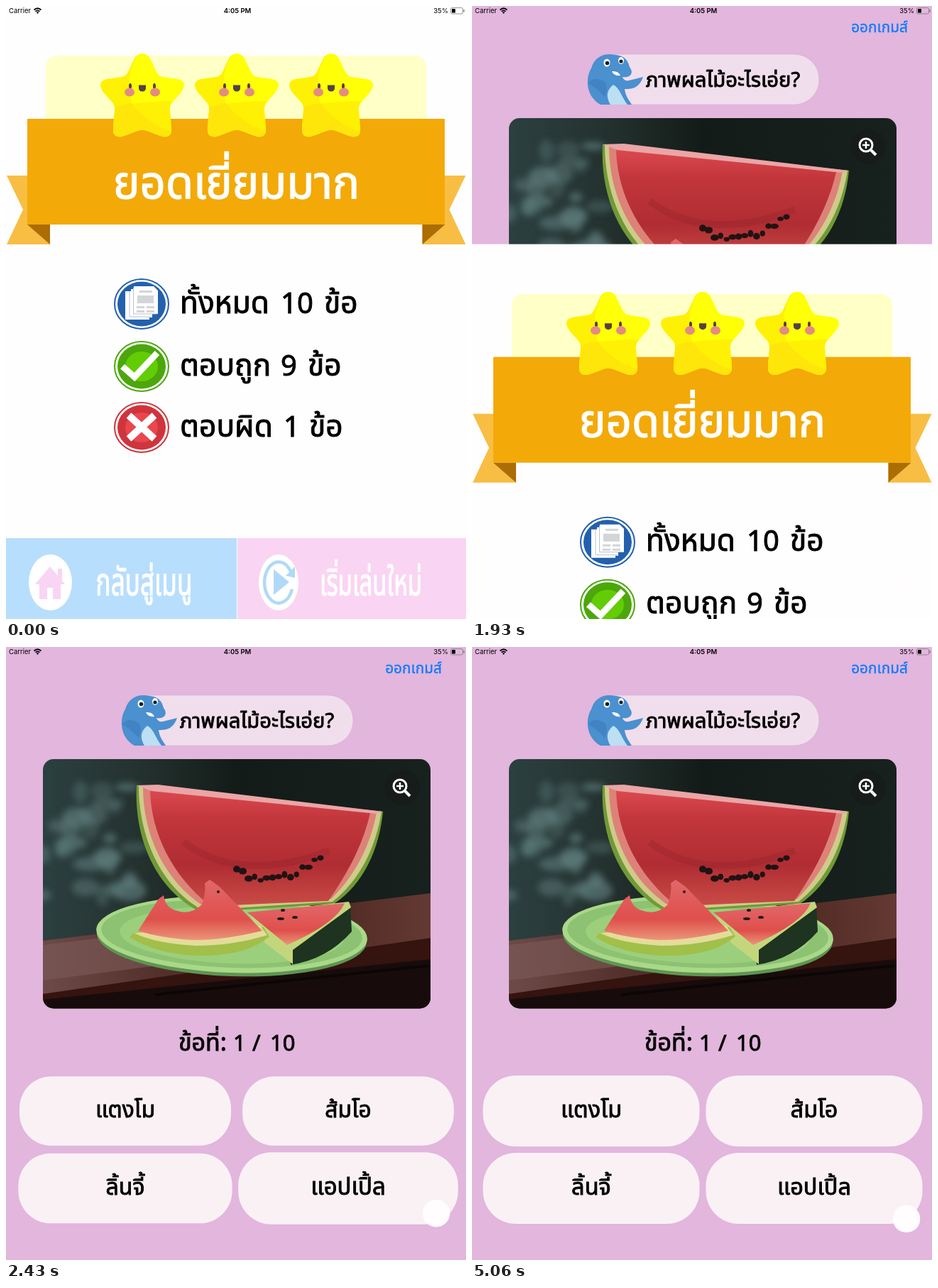
An HTML page that plays this animation: 648 by 864 pixels, repeating every 5.26 s.

```html
<!DOCTYPE html>
<html lang="th">
<head>
<meta charset="utf-8">
<title>Fruit quiz</title>
<style>
  html, body { margin: 0; width: 100%; height: 100%; overflow: hidden; background: #fefefe; }
  svg { display: block; width: 100%; height: 100%; }
  text { font-family: "Noto Sans Thai Looped", "Noto Sans Thai", "Noto Sans", "Noto Serif Thai", sans-serif; }
  .bar text { font: 9.5px Inter, Roboto, sans-serif; }
  .mid { text-anchor: middle; }
  .score { font-size: 42.5px; }
  .num { font-size: 40px; }
  .ink { stroke: #000; stroke-width: .9; }
  .pale { fill: #fff; stroke: #fff; stroke-width: 1.3; }
</style>
</head>
<body>
<svg id="stage" viewBox="0 0 648 864" xmlns="http://www.w3.org/2000/svg">
  <defs>
    <clipPath id="photoClip"><rect x="52" y="158" width="546" height="351.5" rx="15"/></clipPath>
    <clipPath id="starClip"><use href="#starShape"/></clipPath>
    <filter id="soft" x="-30%" y="-30%" width="160%" height="160%"><feGaussianBlur stdDeviation="5"/></filter>
    <linearGradient id="leaves">
      <stop offset="0" stop-color="#2c4040"/><stop offset=".25" stop-color="#24322f"/><stop offset=".5" stop-color="#131b18"/><stop offset="1" stop-color="#17211e"/>
    </linearGradient>
    <linearGradient id="rail">
      <stop offset="0" stop-color="#6d4a48"/><stop offset=".3" stop-color="#54302b"/><stop offset=".7" stop-color="#4d2721"/><stop offset="1" stop-color="#643a33"/>
    </linearGradient>
    <linearGradient id="flesh" x2="0" y2="1">
      <stop offset="0" stop-color="#dc4a50"/><stop offset=".25" stop-color="#c2363b"/><stop offset=".65" stop-color="#b02d33"/><stop offset="1" stop-color="#c94c46"/>
    </linearGradient>
    <linearGradient id="wedge" x2="0" y2="1">
      <stop offset="0" stop-color="#e2686a"/><stop offset=".65" stop-color="#df4f4c"/><stop offset="1" stop-color="#eb9678"/>
    </linearGradient>
    <path id="starShape" d="M0-63Q7-63 11-56L20-37Q23-31 29-30L50-27Q63-24 57-12Q55-8 50-3L42 6Q38 11 39 18L41 42Q42 56 29 54Q25 53 20 51L7 46Q0 43-7 46L-20 51Q-25 53-29 54Q-42 56-41 42L-39 18Q-38 11-42 6L-50-3Q-55-8-57-12Q-63-24-50-27L-29-30Q-23-31-20-37L-11-56Q-7-63 0-63Z"/>
    <g id="star">
      <g clip-path="url(#starClip)">
        <path fill="#ffff05" d="M-65-70H65V60H-65Z"/>
        <path fill="#fff104" d="M0-70C-20-45-22-20-15 8L-65 20V-70Z"/>
        <path fill="#fff104" d="M-65 21Q-15 1 65 5V60H-65Z"/>
        <path fill="#ffe60a" d="M-65 21Q-40 11-15 7Q8 37 45 48V60H-65Z"/>
      </g>
      <g fill="#544146">
        <ellipse cx="-17" cy="-17" rx="2" ry="4"/><ellipse cx="17" cy="-17" rx="2" ry="4"/>
        <path d="M-5-18.5H5V-14A5 4.5 0 0 1-5-14Z"/>
      </g>
      <g fill="#e48b83"><ellipse cx="-18" cy="-8.5" rx="7" ry="6"/><ellipse cx="18" cy="-8.5" rx="7" ry="6"/></g>
    </g>
    <g id="tail">
      <path fill="#f8bd43" d="M1 239H62V336H1L24 287Z"/><path fill="#ac6d05" d="M30 308H62V336Z"/>
    </g>
  </defs>

  <g id="quiz">
    <rect width="648" height="864" fill="#e2b6dd"/>
    <text x="574" y="37" class="mid" font-size="20.800" fill="#0a7aff" stroke="#0a7aff" stroke-width=".3">ออกเกมส์</text>
    <rect x="170" y="68" width="319" height="71" rx="35" fill="#f1deec" stroke="#d3b5cf" stroke-width=".7"/>
    <g>
      <path fill="#4b90cf" d="M181 139C158 126 161 98 168 88C172 72 186 65 202 69C216 70 220 78 222 86C229 95 222 102 212 100C213 104 217 106 221 105L241 100C237 112 229 118 215 117C216 127 222 134 225 139Z"/>
      <path fill="#bcdff3" d="M195 139C187 125 192 117 199 111C208 115 211 129 219 139Z"/>
      <path fill="#4183c3" d="M164 109Q170 99 186 106Q193 114 187 128Q177 117 164 109Z"/>
      <path fill="#fff" d="M197 92Q200 99 209 98Q206 91 197 92Z"/>
      <ellipse cx="190" cy="80" rx="4.500" ry="5.500" fill="#fff"/><ellipse cx="210" cy="77" rx="4" ry="5" fill="#fff"/>
      <circle cx="190.500" cy="80.500" r="2.800" fill="#15202c"/><circle cx="210" cy="78" r="2.600" fill="#15202c"/>
    </g>
    <text x="353.500" y="114" class="mid ink" font-size="29.300">ภาพผลไม้อะไรเอ่ย?</text>

    <g clip-path="url(#photoClip)">
      <rect x="52" y="158" width="546" height="352" fill="url(#leaves)"/>
      <g id="bokeh" filter="url(#soft)" fill="#5f7d7d"></g>
      <path fill="url(#rail)" d="M52 414L598 347V418L52 492Z"/>
      <path fill="#7c5b58" d="M52 420L150 408L205 450L52 470Z" opacity=".6"/>
      <path fill="#35130f" d="M52 489L598 410V455L52 506Z"/>
      <path fill="#170c0b" d="M52 497L598 440V510H52Z"/>
      <path fill="none" stroke="#0c0605" stroke-width="4" d="M210 490L598 449"/>
      <g transform="rotate(2 318 407)">
        <ellipse cx="318" cy="410" rx="190" ry="54" fill="#5f9553"/>
        <ellipse cx="318" cy="405" rx="191" ry="54" fill="#a9d888"/>
        <ellipse cx="318" cy="404" rx="184" ry="48" fill="#8cc271"/>
        <ellipse cx="318" cy="406" rx="158" ry="40" fill="#9bcf7c"/>
      </g>
      <path fill="#6f9a36" d="M184 195C180 270 211 343 275 374L462 362C504 334 526 284 531 232Z"/>
      <path fill="#cfcb8a" d="M187 196C187 266 217 338 277 371L460 359C499 328 521 282 529 232Z"/>
      <path fill="#dd8278" d="M193 198C193 264 223 331 281 367L458 355C493 321 514 277 522 233Z"/>
      <path fill="url(#flesh)" d="M203 201C204 262 234 323 288 365L454 358C484 315 504 274 513 234Z"/>
      <path fill="#eaa5a7" d="M184 195L214 194L531 232L522 235L205 203Z"/>
      <path fill="none" stroke="#8f2229" stroke-width="10" opacity=".3" d="M250 275Q330 335 455 287"/>
      <g id="seeds" fill="#211313"></g>
      <path fill="#1e3320" d="M401 448L399 424L485 362L487 401Q453 440 401 448Z"/>
      <path fill="#c4d67c" d="M342 375L483 359L486 367L404 427V447L365 417Z"/>
      <path fill="url(#wedge)" d="M340 374L477 361Q466 389 396 420Z"/>
      <path fill="#a1bf49" d="M174 409L181 402L363 395L371 408Q337 437 267 435Q210 432 174 409Z"/>
      <path fill="#e4dc9a" d="M180 403L358 393L368 406Q320 421 267 421Q211 418 180 403Z"/>
      <path fill="url(#wedge)" d="M186 400L215 355L222 350Q225 367 238 371Q260 379 276 363Q282 345 280 333L287 328L301 338L361 400Q303 414 262 413Q217 410 186 400Z"/>
      <g fill="#281717"><ellipse cx="387" cy="383" rx="5" ry="2"/><ellipse cx="407" cy="381" rx="4" ry="2"/><ellipse cx="390" cy="371" rx="3" ry="2"/><circle cx="299" cy="345" r="2"/></g>
    </g>
    <circle cx="558" cy="198" r="25" fill="#171b1b" opacity=".75"/>
    <g fill="none" stroke="#fff" stroke-width="3"><circle cx="555" cy="196" r="9"/><path d="M562 203L569 210" stroke-width="4"/><path d="M550 196H560M555 191V201" stroke-width="2.500"/></g>
    <g font-size="31" class="ink">
      <text x="243" y="569" font-size="34">ข้อที่:</text><text x="320" y="569">1</text><text x="347" y="569">/</text><text x="372" y="569">10</text>
    </g>
    <g id="answers"></g>
  </g>

  <g id="result">
    <rect width="648" height="864" fill="#fefefe"/>
    <rect x="56" y="70" width="536" height="120" rx="16" fill="#ffffc8"/>
    <use href="#tail"/><use href="#tail" transform="translate(648.500) scale(-1 1)"/>
    <rect x="30" y="159" width="588" height="149" fill="#f3a908"/>
    <use href="#star" x="192" y="130"/><use href="#star" x="325" y="130"/><use href="#star" x="458" y="130"/>
    <text x="324.500" y="271" class="mid pale" font-size="63.500">ยอดเยี่ยมมาก</text>
    <g id="scores"></g>

    <rect y="750" width="325" height="114" fill="#b8defd"/>
    <ellipse cx="62.500" cy="812.500" rx="30.500" ry="39.500" fill="#fff"/>
    <path fill="#fad4f3" d="M62 790L73 803V793H79V810L83 815H77V836H66V820H58V836H47V815H41Z"/>
    <text transform="translate(194.500 830) scale(.65 1)" class="mid pale" font-size="54">กลับสู่เมนู</text>
    <g id="again">
      <rect x="326" y="750" width="322" height="114" fill="#fad4f3"/>
      <ellipse cx="384" cy="812.500" rx="28" ry="39.500" fill="#fff"/>
      <path fill="none" stroke="#b0d9f7" stroke-width="4.500" d="M403 822A20 29 0 1 1 401 797"/>
      <path fill="#b0d9f7" d="M377 794V830L399 812ZM407 790V806L394 803Z"/>
      <text transform="translate(514 830) scale(.65 1)" class="mid pale" font-size="51">เริ่มเล่นใหม่</text>
    </g>
  </g>

  <circle id="dot" r="19.300" fill="#fffdfe"/>

  <g class="bar">
    <text x="4" y="10">Carrier</text>
    <text x="326" y="10" class="mid" style="font-weight:600">4:05 PM</text>
    <text x="623" y="10" text-anchor="end">35%</text>
    <g fill="none" stroke="#000" stroke-width="1.700"><path d="M39.500 5.500Q44.500 1 49.500 5.500M41.500 7.700Q44.500 5 47.500 7.700"/></g>
    <path d="M42.700 9Q44.500 7.500 46.300 9L44.500 11Z"/>
    <rect x="626.500" y="2.500" width="17" height="8.500" rx="2" fill="none" stroke="#777" stroke-width=".8"/>
    <rect x="628" y="4" width="5" height="5.500" rx=".6"/><rect x="644.500" y="5" width="1.300" height="3.500" rx=".6" fill="#777"/>
  </g>
</svg>
<script>
const LOOP = 5260;
const $ = id => document.getElementById(id);
const clamp = v => Math.max(0, Math.min(1, v));

// Score rows: ring icon, label, count and count unit.
const marks = {
  pages: `<path fill="#fff" d="M168 402H176V399H180V395H208L214 401V434H206V439H202V442H168Z"/>
    <path fill="none" stroke="#b9c3cf" d="M174 402V438H204M179.500 397V434H212"/>
    <path fill="#d3d5d8" d="M188 401H206V404H188ZM185 408H208V419H185ZM184 423H195V426H184ZM198 423H209V426H198ZM184 429H195V432H184ZM198 429H209V432H198Z"/>`,
  tick: '<path fill="none" stroke="#fff" stroke-width="9" d="M164 508L181 523L213 489"/>',
  cross: '<path fill="none" stroke="#fff" stroke-width="10" d="M173 577L209 610M209 577L173 610"/>'
};
const row = (y, ring, core, mark, label, count, cx, ux) => `
  <g fill="${ring}">
    <ellipse cx="191" cy="${y}" rx="38" ry="35" fill="#fff" stroke="${ring}" stroke-width="2"/>
    <ellipse cx="191" cy="${y}" rx="34" ry="31.500"/>
    <ellipse cx="191" cy="${y}" rx="23" ry="21" fill="${core}"/>
  </g>${marks[mark]}
  <g class="score ink"><text x="245" y="${y + 12.5}">${label}</text><text class="num" x="${cx}" y="${y + 12.5}">${count}</text><text x="${ux}" y="${y + 12.5}">ข้อ</text></g>`;
$('scores').innerHTML =
  row(420, '#2360ad', '#2360ad', 'pages', 'ทั้งหมด', 10, 387, 448) +
  row(508, '#4ba70b', '#62cd05', 'tick', 'ตอบถูก', 9, 387, 425) +
  row(594, '#d0343d', '#e9464d', 'cross', 'ตอบผิด', 1, 391, 427);

// Blurred foliage and melon seeds.
let seed = 7;
const rnd = () => (seed = seed * 16807 % 2147483647) / 2147483647;
for (let i = 0; i < 28; i++) {
  $('bokeh').innerHTML += `<ellipse cx="${50 + rnd() * 135}" cy="${175 + rnd() * 190}" rx="${9 + rnd() * 16}" ry="${6 + rnd() * 10}" opacity="${.3 + rnd() * .4}"/>`;
}
for (let i = 0; i < 15; i++) {
  const u = i / 14;
  $('seeds').innerHTML += `<ellipse cx="${325 + u * 118}" cy="${312 - 20 * u + 76 * u * (1 - u) + rnd() * 8}" rx="${3 + rnd() * 3}" ry="${2.5 + rnd() * 2.5}"/>`;
}

const answers = ['แตงโม', 'ส้มโอ', 'ลิ้นจี้', 'แอปเปิ้ล'].map((word, i) => {
  const g = document.createElementNS('http://www.w3.org/2000/svg', 'g');
  g.innerHTML = `<rect x="-152.500" y="-50" width="305" height="100" rx="46" fill="#faf1f5"/>
    <text y="9" class="mid ink" font-size="32.500">${word}</text>`;
  $('answers').append(g);
  return { g, x: i % 2 ? 482 : 168, y: i < 2 ? 654 : 763, start: 1943 + i * 40 };
});

// Underdamped spring from 0 to 1.
function spring(ms) {
  if (ms <= 0) return 0;
  const a = ms * .01356, k = .59;
  return 1 - Math.exp(-k * a) * (Math.cos(a) + k * Math.sin(a));
}

// Touch marker: time, x, y.
const path = [
  [150, 662, 815], [300, 637, 816], [660, 611, 814], [950, 597, 806], [1200, 604, 809],
  [1460, 608, 813], [1860, 609, 814], [2400, 606, 798], [2900, 606.5, 801], [3000, 607, 802],
  [3430, 609, 803.5], [3660, 611, 805], [4030, 614, 806], [4500, 614, 804.5], [4660, 613, 805], [5060, 612, 806]
];
function dotAt(t) {
  const i = path.findIndex(p => p[0] > t);
  if (i < 0) return path[path.length - 1];
  if (i === 0) return path[0];
  const a = path[i - 1], b = path[i], u = (t - a[0]) / (b[0] - a[0]);
  return a.map((v, n) => v + (b[n] - v) * u);
}

function draw(t) {
  const shift = 864 * (1 - Math.exp(-.00972 * Math.max(0, t - 1880.4)));
  $('result').setAttribute('transform', `translate(0 ${t < 2390 ? shift : 864})`);
  $('again').setAttribute('opacity', 1 - .8 * clamp((t - 1600) / 100));
  for (const b of answers) {
    b.g.setAttribute('transform', `translate(${b.x} ${b.y}) scale(${spring(t - b.start)})`);
  }
  const [, x, y] = dotAt(t);
  $('dot').setAttribute('transform', `translate(${x} ${y})`);
  $('dot').setAttribute('visibility', t < 160 ? 'hidden' : 'visible');
}

const begin = performance.now();
function tick() {
  draw((performance.now() - begin) % LOOP);
  requestAnimationFrame(tick);
}
tick();
</script>
</body>
</html>
```
